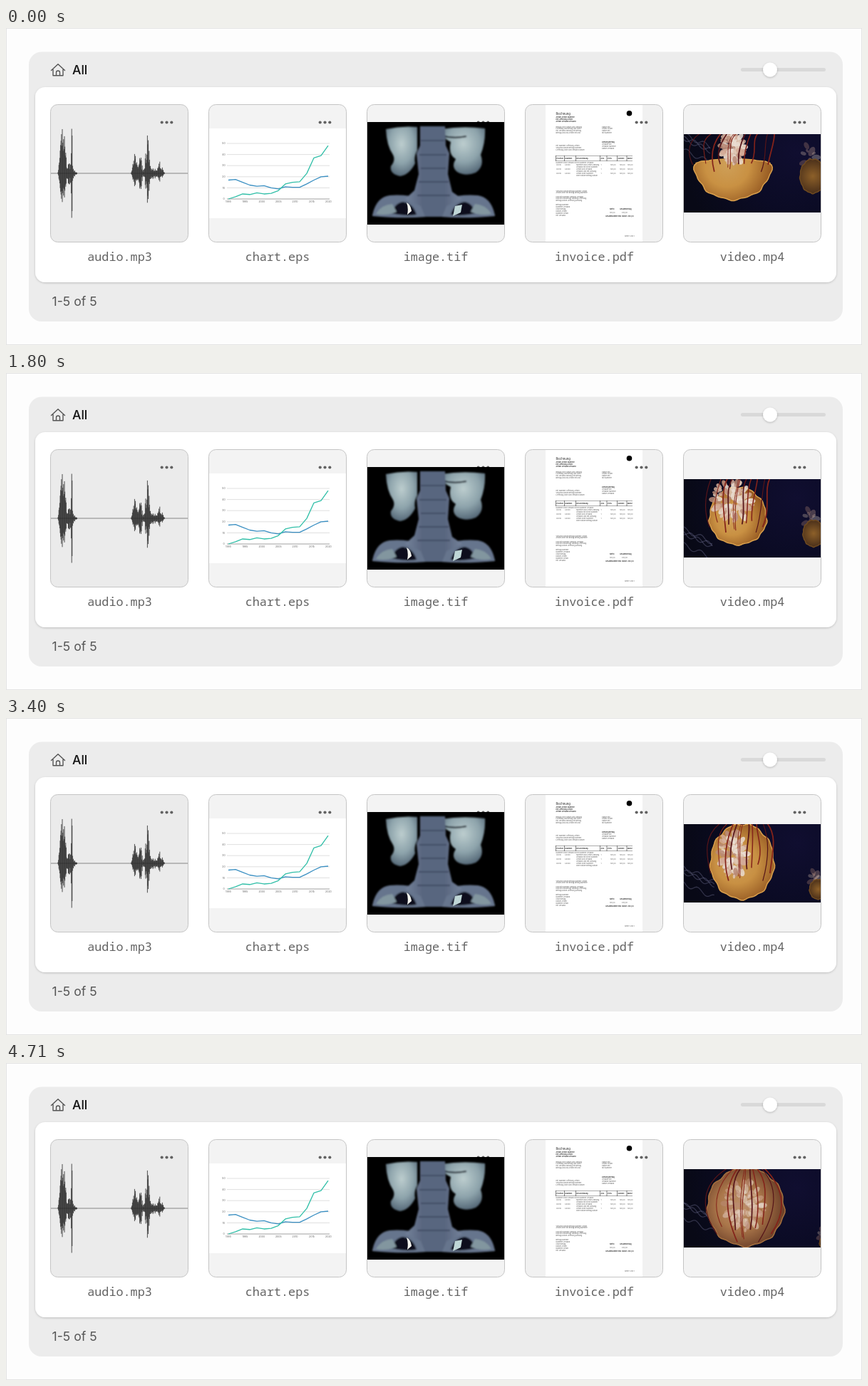
An HTML page with a canvas for the animation above (4810 ms loop, 1201 by 445 pixels).

```html
<!DOCTYPE html>
<html lang="en">
<head>
<meta charset="utf-8">
<title>File gallery</title>
<style>
html, body { margin: 0; width: 100%; height: 100%; overflow: hidden; background: #fdfdfd; }
svg, canvas { position: absolute; left: 0; top: 0; display: block; }
canvas { left: 951px; top: 149px; }
.ui { font-family: Inter, Roboto, sans-serif; }
.name { font: 16.8px "Noto Sans Mono", "DejaVu Sans Mono", monospace; fill: #636363; text-anchor: middle; }
.axis { font: 3.5px Inter, sans-serif; fill: #666; text-anchor: middle; }
.print { font: 2.4px Inter, sans-serif; fill: #555; }
.print .b { font-weight: 600; fill: #222; }
</style>
</head>
<body>
<svg width="1201" height="445" viewBox="0 0 1201 445" fill="none">
  <defs>
    <rect id="tile" x=".5" y="107.5" width="193" height="193" rx="10"/>
    <clipPath id="clip"><rect x="728.5" y="107.5" width="193" height="193" rx="10"/></clipPath>
    <g id="dots" fill="#626262">
      <circle cx="156.7" cy="132.5" r="2.1"/><circle cx="163.5" cy="132.5" r="2.1"/><circle cx="170.3" cy="132.5" r="2.1"/>
    </g>
    <filter id="shade" x="-5%" y="-10%" width="110%" height="125%">
      <feDropShadow dx="0" dy="1" stdDeviation="1.5" flood-opacity=".2"/>
    </filter>
    <filter id="knob" x="-50%" y="-50%" width="200%" height="200%">
      <feDropShadow dx="0" dy="1" stdDeviation="1.5" flood-opacity=".25"/>
    </filter>
    <filter id="soft"><feGaussianBlur stdDeviation="1.3"/></filter>
    <radialGradient id="lung" cy=".35" r=".65">
      <stop stop-color="#bccdce"/><stop offset=".6" stop-color="#8da3ab"/><stop offset="1" stop-color="#576a79"/>
    </radialGradient>
    <linearGradient id="bone">
      <stop stop-color="#74829a"/><stop offset=".3" stop-color="#59667f"/><stop offset=".7" stop-color="#59667f"/><stop offset="1" stop-color="#74829a"/>
    </linearGradient>
    <g id="wing">
      <path d="M514 263Q519 238 538 235Q562 233 583 240L590 265Q556 268 514 264Z" fill="#66758d"/>
      <path d="M541 260Q546 245 557 244Q571 246 576 262Q560 265 541 260Z" fill="#0d111c"/>
      <path d="M519 261Q527 248 542 247L548 258Q535 264 519 261Z" fill="#82969f"/>
    </g>
  </defs>

  <rect x=".5" y=".5" width="1200" height="444" stroke="#e4e4e4"/>
  <rect x="32" y="33.5" width="1142" height="378.5" rx="18" fill="#ececec"/>
  <rect x="41" y="83" width="1124" height="274" rx="14" fill="#fff" filter="url(#shade)"/>

  <path d="M63.5 59.5L73 50.7L82.5 59.5M66 58V66.8H80V58M70.5 66.5V62.5Q70.5 60 73 60T75.5 62.5V66.5" stroke="#555" stroke-width="1.4" stroke-linecap="round" stroke-linejoin="round"/>
  <text class="ui" x="93" y="65" font-size="17.5" font-weight="500" fill="#111">All</text>
  <rect x="1031" y="56" width="119" height="5" rx="2.5" fill="#d9d9d9"/>
  <circle cx="1072" cy="58.5" r="10" fill="#fff" filter="url(#knob)"/>
  <text class="ui" x="64.5" y="390" font-size="17.6" fill="#555">1-5 of 5</text>

  <!-- audio -->
  <use href="#tile" x="62" fill="#ebebeb"/>
  <path d="M63 204H256" stroke="#858585"/>
  <path id="wave" stroke="#282828" stroke-width=".8"/>
  <use href="#dots" x="62"/>

  <!-- chart -->
  <use href="#tile" x="284" fill="#f3f3f3"/>
  <rect x="285" y="141" width="192" height="126" fill="#fff"/>
  <g id="chart" stroke-linejoin="round"></g>
  <use href="#dots" x="284"/>

  <!-- scan -->
  <use href="#tile" x="506" fill="#f3f3f3"/>
  <use href="#dots" x="506"/>
  <rect x="507" y="132" width="192" height="144" fill="#000"/>
  <g filter="url(#soft)">
    <path d="M533 142Q555 137 577 139L577 172Q572 180 574 190Q566 206 553 208Q538 205 540 194Q547 186 543 178Q534 165 533 142Z" fill="url(#lung)"/>
    <path d="M611 142Q640 137 672 141Q673 160 666 178Q672 194 659 203Q645 209 633 202Q624 195 631 184Q620 178 624 160Q612 155 611 142Z" fill="url(#lung)"/>
    <path d="M611 151Q628 156 646 152" stroke="#101723" stroke-width="2"/>
    <use href="#wing"/>
    <use href="#wing" transform="matrix(-1 0 0 1 1200 0)"/>
    <path d="M581 138H616L617 165L622 176L620 205L626 230L640 240L618 250L612 265H588L582 250L560 240L573 228L579 205L576 176L581 165Z" fill="url(#bone)"/>
    <path d="M582 158H615M580 178H618M582 197H617M579 216H621M577 235H623" stroke="#3f4b63" stroke-width="2"/>
  </g>
  <path d="M562 245Q568 248 569 257L563 262Q565 253 562 245Z" fill="#f3f4ee"/>
  <path d="M627 264L630 250L640 248L638 259Z" fill="#bfd6d6"/>

  <!-- invoice -->
  <use href="#tile" x="728" fill="#f1f1f1"/>
  <g clip-path="url(#clip)">
    <rect x="757" y="108" width="136" height="193" fill="#fff"/>
    <text class="ui" x="771.5" y="121.5" font-size="4.3" fill="#222">Rechnung</text>
    <circle cx="874.5" cy="119.8" r="3.8" fill="#000"/>
    <path d="M771 179.5H879M771 186.5H879" stroke="#555" stroke-width=".5"/>
    <g id="print" class="print"></g>
  </g>
  <use href="#dots" x="728"/>

  <use href="#tile" x="950" fill="#f3f3f3"/>
  <use href="#dots" x="950"/>

  <g stroke="#c4c4c4">
    <use href="#tile" x="62"/><use href="#tile" x="284"/><use href="#tile" x="506"/><use href="#tile" x="728"/><use href="#tile" x="950"/>
  </g>
  <g class="name">
    <text x="159.5" y="327">audio.mp3</text><text x="381" y="327">chart.eps</text><text x="603" y="327">image.tif</text>
    <text x="825.5" y="327">invoice.pdf</text><text x="1047" y="327">video.mp4</text>
  </g>
</svg>
<canvas id="video" width="192" height="110"></canvas>

<script>
const $ = id => document.getElementById(id);
const lerp = (a, b, u) => a + (b - a) * u;
const clamp = (v, a = 0, b = 1) => Math.max(a, Math.min(b, v));
const ease = (u, from, to) => { const x = clamp((u - from) / (to - from)); return x * x * (3 - 2 * x); };

function random(seed) {
  return () => (seed = (seed * 16807) % 2147483647) / 2147483647;
}

// Value at u in 0..1 along evenly spaced key values.
function along(u, ...keys) {
  const x = u * (keys.length - 1), i = Math.min(Math.floor(x), keys.length - 2);
  return lerp(keys[i], keys[i + 1], x - i);
}

function drawWave() {
  const rnd = random(41);
  const bursts = [ // centre, width, height above, height below
    [80, 4.2, 80, 52], [92.2, 1.1, 74, 74], [88, 7, 16, 18],
    [181, 3, 36, 24], [188, 3.5, 26, 26], [198.5, 3.3, 54, 42], [216, 4, 17, 12], [206, 11, 7, 8]
  ];
  let d = "";
  for (let x = 73; x < 228; x += 0.6) {
    let up = 0, down = 0;
    for (const [c, w, a, b] of bursts) {
      const g = Math.exp(-(((x - c) / w) ** 2));
      up = Math.max(up, a * g);
      down = Math.max(down, b * g);
    }
    const gain = 0.35 + 0.65 * rnd();
    if (up > 1) d += `M${x.toFixed(1)} ${204 - up * gain}V${204 + down * gain}`;
  }
  $("wave").setAttribute("d", d);
}

function drawChart() {
  const plotY = value => 240 - value * 1.56;
  const line = (color, ...values) =>
    `<path d="M${values.map((v, i) => `${312 + i * 10} ${plotY(v)}`).join("L")}" stroke="${color}" stroke-width="1.3"/>`;
  let out = "";
  for (let v = 0; v <= 50; v += 10)
    out += `<path d="M310 ${plotY(v)}H454" stroke="${v ? "#d8d8d8" : "#888"}" stroke-width=".8"/>` +
      `<text class="axis" x="305.5" y="${plotY(v) + 1.2}">${v}</text>`;
  for (let i = 0; i < 7; i++)
    out += `<text class="axis" x="${312 + i * 23.4}" y="245.3">${1990 + i * 5}</text>`;
  $("chart").innerHTML = out +
    line("#3a8fc2", 17, 17.5, 15, 12.5, 11.5, 12, 10, 9, 11, 10.5, 10.5, 13.5, 17, 20, 20.5) +
    line("#31bfa8", 0, 2, 4.5, 4, 5.5, 4.5, 5, 7.5, 13.5, 15, 15.5, 23, 37, 39, 48);
}

function drawPrint() {
  const words = ["Artikel", "und", "Lieferung", "Nummer", "Betrag", "mit", "Versand", "Zahlung", "ohne", "Datum"];
  const rnd = random(23);
  let out = "";
  const put = (x, y, text, bold) => out += `<text x="${x}" y="${y}"${bold ? ' class="b"' : ""}>${text}</text>`;
  function block(x, y, rows, length, bold) {
    for (let i = 0; i < rows; i++) {
      let text = "";
      while (text.length < length - 4) text += words[Math.floor(rnd() * 10)] + " ";
      put(x, y + i * 2.9, text, bold);
    }
  }
  block(771.5, 126, 3, 22, true);
  block(771.5, 139.5, 4, 34);
  block(836, 139.5, 4, 14);
  block(836, 161, 1, 14, true);
  block(836, 164, 3, 14);
  block(771.5, 166, 3, 32);
  "Position Nummer Beschreibung Anz. Preis Summe MwSt".split(" ").forEach((word, i) => {
    const x = along(i / 6, 772, 784, 800, 834, 843.5, 858, 871.5);
    put(x + 0.6, 184, word, true);
    out += `<path d="M${x - 0.5} 179V187" stroke="#333" stroke-width=".6"/>`;
  });
  block(771.5, 189.5, 1, 44);
  for (let y = 193; y < 206; y += 5.8) {
    put(772, y, "00010");
    put(784, y, "A0000");
    block(800, y, 2, 24);
    put(834.5, y, "1");
    for (const x of [848, 861, 872]) put(x, y, "120,00");
  }
  block(771.5, 229.5, 2, 38);
  block(771.5, 237.5, 3, 32);
  block(771.5, 249, 6, 16);
  put(847, 254.5, "Netto", true);
  put(861, 254.5, "Gesamtbetrag", true);
  put(847, 260, "120,00");
  put(864, 260, "240,00");
  put(841, 264.5, "Gesamtsumme inkl. MwSt: 240,00", true);
  put(868, 292.5, "Seite 1 von 1");
  $("print").innerHTML = out;
}

const ctx = $("video").getContext("2d");

function gradient(x, y, r, ...colors) {
  const g = ctx.createRadialGradient(x, y, 0, x, y, r);
  colors.forEach((c, i) => g.addColorStop(i / (colors.length - 1), c));
  return g;
}

const mix = (a, b, u) => `rgb(${a.map((v, i) => Math.round(lerp(v, b[i], u)))})`;

function bell(x, y, rx, up, down, fill, edge) {
  ctx.beginPath();
  for (let a = 0; a < 6.28; a += 0.07) {
    const r = 1 + 0.02 * Math.sin(a * 9) + 0.015 * Math.sin(a * 17), s = Math.sin(a);
    ctx.lineTo(x + rx * r * Math.cos(a), y + (s < 0 ? up : down) * r * s);
  }
  ctx.closePath();
  ctx.fillStyle = fill;
  ctx.fill();
  ctx.strokeStyle = edge;
  ctx.lineWidth = 1.5;
  ctx.stroke();
}

function frill(x, y, rx, ry, alpha, count) {
  const rnd = random(5), tones = ["#eaddd2", "#d3ab98", "#dfc7b4", "#b98a76"];
  ctx.globalAlpha = alpha;
  for (let i = 0; i < count; i++) {
    const a = rnd() * 6.28, r = Math.sqrt(rnd()), size = 2.5 + rnd() * 5;
    ctx.fillStyle = tones[i % 4];
    ctx.beginPath();
    ctx.ellipse(x + rx * r * Math.cos(a), y + ry * r * Math.sin(a), size, size * 0.6, a, 0, 7);
    ctx.fill();
  }
  ctx.globalAlpha = 1;
}

function strands(x, y, time) {
  const rnd = random(77);
  ctx.strokeStyle = "rgba(125,125,160,.35)";
  ctx.lineWidth = 1.3;
  for (let i = 0; i < 4; i++) {
    const phase = rnd() * 6 + time / 900, drop = (rnd() - 0.5) * 30;
    ctx.beginPath();
    for (let u = -1; u <= 1; u += 0.08)
      ctx.lineTo(x + u * 26, y + drop + u * 12 + 3.5 * Math.sin(u * 7 + phase));
    ctx.stroke();
  }
}

// Threads from the bell, at the given height within it, up to the top edge.
function tentacles(x, y, rx, up, down, topX, spread, height, time) {
  const rnd = random(19), count = 11;
  for (let i = 0; i < count; i++) {
    const u = lerp(-1, 1, i / (count - 1)) + (rnd() - 0.5) * 0.2;
    const v = clamp(height + (rnd() - 0.5) * 0.5, -0.9, 0.9);
    const footX = x + u * rx * 0.95 * Math.sqrt(1 - v * v), footY = y + v * (v < 0 ? up : down);
    const sway = 5 * Math.sin(time / 500 + i * 1.7);
    ctx.strokeStyle = i % 3 ? "#84231a" : "#561519";
    ctx.lineWidth = 0.9 + rnd() * 0.9;
    ctx.beginPath();
    ctx.moveTo(footX, footY);
    ctx.bezierCurveTo(x + u * rx * 1.1 + sway, lerp(footY, 147, 0.4), x + u * rx * 1.05 - sway, lerp(footY, 147, 0.75), topX + u * spread, 147);
    ctx.stroke();
  }
}

function drawVideo(time) {
  const u = time / 4710, late = ease(u, 0.7, 0.95);
  ctx.setTransform(1, 0, 0, 1, -951, -149);
  ctx.fillStyle = gradient(1110, 175, 160, "#100e30", "#0b0b25", "#080916");
  ctx.fillRect(951, 149, 192, 110);
  strands(962 + 8 * u, 166 + 71 * ease(u, 0, 0.25) - 22 * ease(u, 0.6, 0.9), time);

  const farX = 1132 + 20 * u ** 3, farY = 208 + 45 * u, farW = 18 - 8 * u, farH = 24 - 14 * u;
  frill(farX - 4, farY - farH * 1.1, farW * 0.6, farH * 0.8, 0.3, 14);
  bell(farX, farY, farW, farH, farH, gradient(farX, farY, farH, "#8d6029", "#4b301a"), "#6f4a20");

  const x = 1020 + 18 * u, y = along(u, 192, 213, 209, 194, 204, 201, 202);
  const rx = 46 + 8 * Math.cos(u * 2 * Math.PI), up = 8 + 46 * ease(u, 0.1, 0.5);
  const down = 241 + 16 * ease(u, 0.5, 0.8) - y;
  const fill = gradient(x - 8, y, Math.max(rx, down) * 1.15,
    mix([206, 159, 88], [190, 146, 108], late), mix([201, 145, 67], [170, 118, 74], late), mix([150, 90, 34], [104, 60, 38], late));
  bell(x, y, rx, up, down, fill, mix([218, 160, 76], [166, 112, 62], late));

  const frillX = along(u, 1021, 1025, 1017, 1031, 1019, 1027, 1038);
  frill(frillX, 167 + 33 * u, along(u, 17, 19, 27, 36, 18, 26, 30), 24 + 12 * u, 0.85 - 0.35 * late, 90);
  tentacles(x, y, rx, up, down, 1030 + 10 * u, 50 - 26 * u, along(u, 0, -0.2, 0.3, 0.4, 0.1, 0.7, 0.7), time);
}

const step = 1000 / 15;
function tick(now) {
  const time = now % 4810;
  drawVideo(Math.min(4710, Math.floor((time + 4) / step) * step));
  requestAnimationFrame(tick);
}

drawWave();
drawChart();
drawPrint();
requestAnimationFrame(tick);
</script>
</body>
</html>
```
